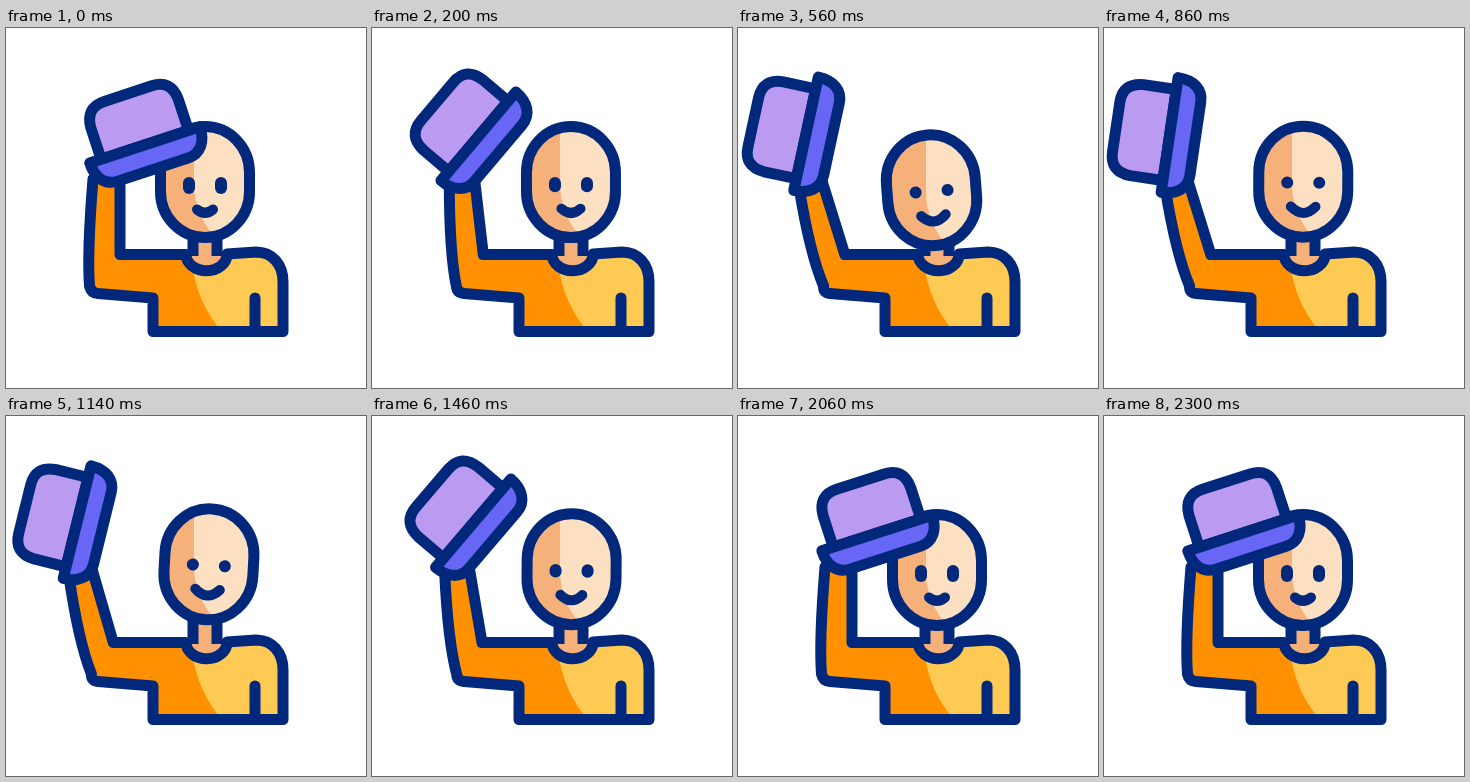
These frames come from a looping animation (360x360 px, 3.6 s). An HTML page:

```html
<!DOCTYPE html>
<html lang="en">
<head>
<meta charset="utf-8">
<title>Tipping the hat</title>
<style>
  html, body { margin: 0; height: 100%; overflow: hidden; background: #fff; }
  svg { display: block; width: 100vw; height: 100vh; }
  .line { fill: none; stroke: #02287b; stroke-width: 11; stroke-linejoin: round; }
  .round { stroke-linecap: round; }
</style>
</head>
<body>
<svg viewBox="0 0 360 360">
  <defs>
    <clipPath id="face"><rect x="154.5" y="98.5" width="89" height="111" rx="44.5" ry="46"/></clipPath>
  </defs>

  <path d="M187 200H211V227H221A20.5 16.5 0 0 1 180 228H187Z" fill="#f6b17b"/>
  <path class="line" d="M187 200V228M211 200V228"/>

  <path id="shirt" fill="#ff9100"/>
  <path fill="#ffca54" d="M186 235C189 260 199 285 216 303.5H277V254C277 236 266 224 250 224L221 226A20.5 16.5 0 0 1 186 240Z"/>
  <path class="line round" d="M249 270V303"/>
  <path id="outline" class="line round"/>

  <g id="head">
    <g clip-path="url(#face)">
      <path fill="#fde0c1" d="M140 80H260V225H140Z"/>
      <path id="shade" fill="#f6b17b" d="M120 80H188V155C188 178 197 196 210 211V225H120Z"/>
    </g>
    <rect class="line" x="154.5" y="98.5" width="89" height="111" rx="44.5" ry="46"/>
    <rect class="eye" x="177" width="12" rx="6" fill="#02287b"/>
    <rect class="eye" x="209" width="12" rx="6" fill="#02287b"/>
    <path id="smile" class="line round" style="stroke-width:10"/>
  </g>

  <g id="hat">
    <path class="line" style="fill:#bb9af2" d="M-46 0V-33Q-45 -54 -25 -54H25Q45 -54 46 -33V0Z"/>
    <path class="line" style="fill:#6866f5" d="M-58 0H58C58 16 50 26 37 26H-37C-50 26 -58 16 -58 0Z"/>
  </g>
</svg>
<script>
const LOOP = 3600;
const $ = id => document.getElementById(id);
const eyes = document.querySelectorAll('.eye');

// Smooth step from 0 to 1 between times a and b.
function ramp(t, a, b) {
  const u = Math.min(1, Math.max(0, (t - a) / (b - a)));
  return u * u * (3 - 2 * u);
}

const armSwing = t => 1.03 * (ramp(t, 0, 480) - ramp(t, 980, 2020));
const joy = t => ramp(t, 0, 500) - ramp(t, 1200, 1900);

// The hat is thrown out and back like a pendulum, then overshoots and settles.
function hatTurn(t) {
  const half = 830, rest = t - 2 * half;
  return rest < 0
    ? 1.06 * (1 - Math.abs((t - half) / half) ** 2.5)
    : -.0032 * rest * Math.exp(-rest / 60);
}

// One dip and a smaller rise.
function nod(t) {
  const u = (t - 200) / 1300;
  return u > 0 && u < 1 ? (.65 * u - 1.2) * Math.sin(2 * Math.PI * u) : 0;
}

function draw(t) {
  const p = armSwing(t), q = nod(t), k = joy(t);

  const arm = `M${87 - 25 * p} ${151 + 9 * p}Q${81 - 9 * p} 225 ${83.5 + 2 * p} 258Q85 265 92 265.5`
    + 'L147 270V303.5H277V254C277 236 266 224 250 224L221 226A20.5 16.5 0 0 1 180 226.5'
    + `H${114 - 7 * p}L${114 - 30 * p} ${148 + 2 * p}`;
  $('shirt').setAttribute('d', arm);
  $('outline').setAttribute('d', arm);

  // The hat turns about the point where the hand holds its brim.
  $('hat').setAttribute('transform',
    `translate(${115 - 29.6 * p} ${150 - 6.5 * p * p}) rotate(${-18 - 60 * hatTurn(t)}) translate(33 -24)`);

  // The head tilts, its shadow edge stays upright.
  const tilt = 4.4 * q;
  $('head').setAttribute('transform', `translate(0 ${-8 * q}) rotate(${tilt} 199 225)`);
  $('shade').setAttribute('transform', `rotate(${-tilt} 199 225)`);

  const tall = 17 - 5 * k, wide = 8 + 4.3 * k;
  for (const e of eyes) {
    e.setAttribute('y', 157.5 - 2.5 * k - tall / 2);
    e.setAttribute('height', tall);
  }
  $('smile').setAttribute('d', `M${199 - wide} ${181.5 - 2.5 * k}q${wide} ${6.5 + 6 * k} ${2 * wide} 0`);
}

function tick(now) {
  draw(now % LOOP);
  requestAnimationFrame(tick);
}
draw(0);
requestAnimationFrame(tick);
</script>
</body>
</html>
```
